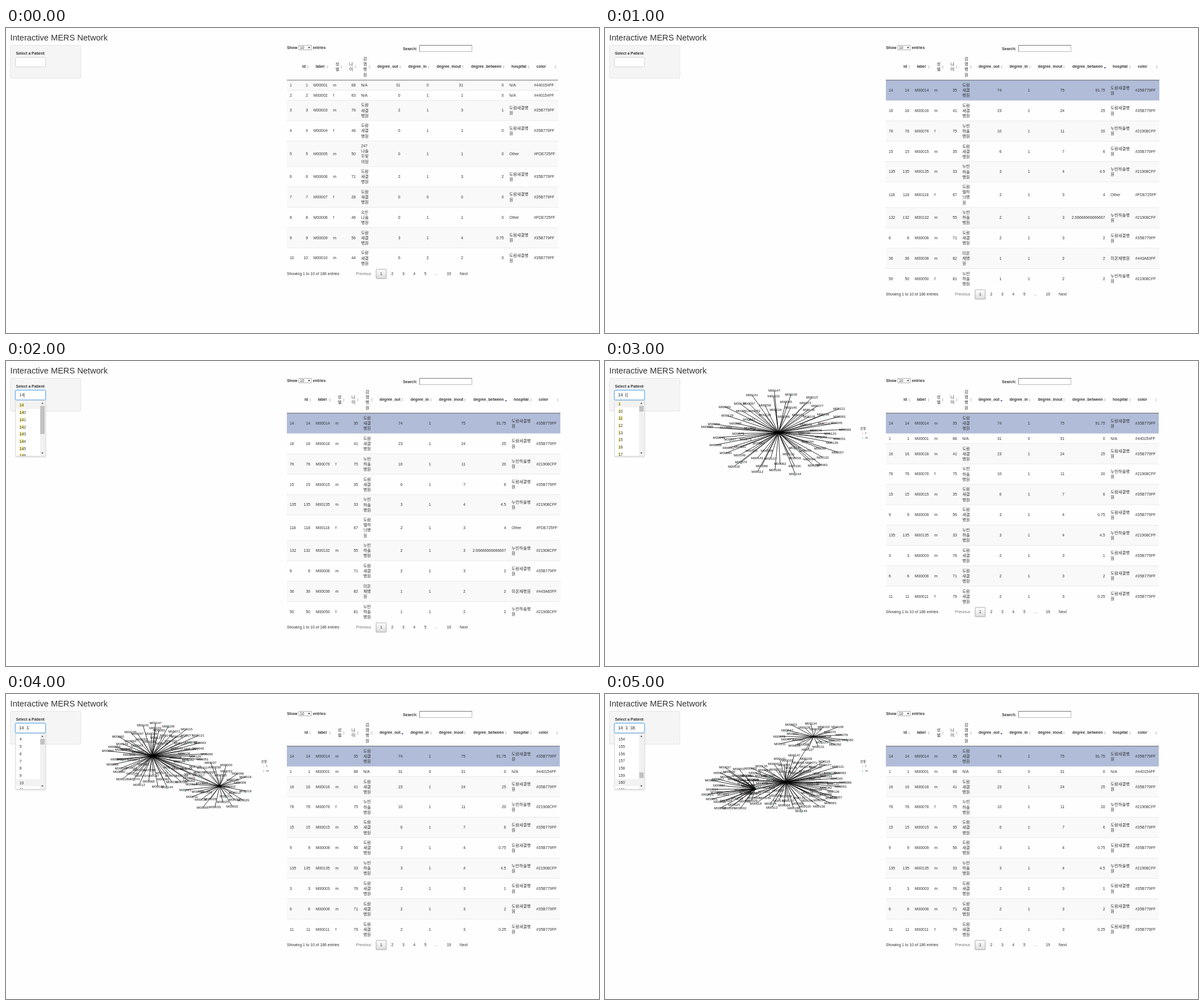
These frames come from a looping animation (1043 px wide and 537 px high, 6000 ms). An HTML page:

```html
<!DOCTYPE html>
<html lang="ko">
<head>
<meta charset="utf-8">
<title>Interactive MERS Network</title>
<style>
html, body { margin: 0; width: 100%; height: 100%; overflow: hidden; background: #fefefe; }
svg { display: block; width: 1043px; height: 537px; }
text { font: 6.84px "Liberation Sans", Arial, "Noto Sans CJK KR", "Noto Sans CJK", sans-serif; fill: #333; white-space: pre; }
.b { font-weight: bold; }
.k { font: 7.3px "Noto Sans CJK KR", "Noto Sans CJK", sans-serif; }
.k.b { font-weight: 500; }
.title { font-size: 14.6px; }
.dim { fill: #777; }
.node { font-size: 5.86px; fill: #111; text-anchor: middle; }
.edge { stroke: #000; stroke-width: .8; }
.slot { visibility: hidden; animation: 6s step-end infinite; }
.for1 { animation-name: one; }
.for2 { animation-name: two; }
.for3 { animation-name: three; }
@keyframes one { 0% { visibility: visible } 16.666%, 100% { visibility: hidden } }
@keyframes two { 0% { visibility: visible } 33.333%, 100% { visibility: hidden } }
@keyframes three { 0% { visibility: visible } 50%, 100% { visibility: hidden } }
</style>
</head>
<body>
<svg id="stage" viewBox="0 0 1043 537"></svg>
<script>
const rect = (x, y, w, h, fill, more = '') =>
  `<rect x="${x}" y="${y}" width="${w}" height="${h}" fill="${fill}" ${more}/>`;
const path = (d, fill) => `<path d="${d}" fill="${fill}"/>`;
const line = (x1, y1, x2, y2, more) => `<line x1="${x1}" y1="${y1}" x2="${x2}" y2="${y2}" ${more}/>`;
// y is the vertical middle of the glyphs
const text = (s, x, y, cls = '', anchor = 'start', size = 6.84) =>
  `<text x="${x}" y="${(y + size * .36).toFixed(2)}" class="${cls}" text-anchor="${anchor}">${s}</text>`;
const right = (s, x, y) => text(s, x, y, '', 'end');
const korean = (lines, x, y, cls = '') => lines.map((s, i) =>
  text(s, x, y + (i - (lines.length - 1) / 2) * 9.15, /[가-힣]/.test(s) ? 'k ' + cls : cls, 'start', 7.2)).join('');
const label = id => 'M' + String(id).padStart(5, 0);
const slot = (start, secs, body) =>
  `<g class="slot for${secs}" style="animation-delay:${start - 6}s">${body}</g>`;

// table
const places = {
  N: ['N/A', 'N/A', '#440154FF'],
  P: ['도람 새결 병원', '도람새결병 원', '#35B779FF'],
  S: ['누빈 하솔 병원', '누빈하솔병 원', '#21908CFF'],
  C: ['247 나솔 두빛 의원', 'Other', '#FDE725FF'],
  A: ['오든 나솔 병원', 'Other', '#FDE725FF'],
  G: ['도람 별하 늬병 원', 'Other', '#FDE725FF'],
  K: ['미온 재병 원', '미온재병원', '#443A83FF']
};

// id sex age place out in between
const patients = {};
`1 m 68 N 31 0 0
2 f 63 N 0 1 0
3 m 76 P 2 1 1
4 f 46 P 0 1 0
5 m 50 C 0 1 0
6 m 71 P 2 1 2
7 f 28 P 0 0 0
8 f 46 A 0 1 0
9 m 56 P 3 1 0.75
10 m 44 P 0 2 0
11 f 79 P 2 1 0.25
14 m 35 P 74 1 91.75
15 m 35 P 6 1 6
16 m 41 P 23 1 25
36 m 82 K 1 1 2
50 f 81 S 1 1 2
76 f 75 S 10 1 20
118 f 67 G 2 1 4
132 m 55 S 2 1 2.66666666666667
135 m 33 S 3 1 4.5`.split('\n').forEach(row => patients[row.split(' ')[0]] = row.split(' '));

const heads = [['id', 521], ['label', 544.5], ['degree_out', 653], ['degree_in', 707.5],
  ['degree_inout', 757.5], ['degree_between', 818], ['hospital', 889], ['color', 933]];
const icons = [531, 565.5, 590, 614.7, 639.5, 693.3, 743.3, 803.3, 875.3, 919.3];

function sortIcon(x, sorted) {
  return sorted ? path(`M${x - 2} 69h4l-2 2.8z`, '#5a62a8')
    : path(`M${x - 1.8} 68h3.6l-1.8 -2.5z M${x - 1.8} 69.2h3.6l-1.8 2.5z`, '#ccc');
}

function pager(y) {
  let s = text('Showing 1 to 10 of 186 entries', 494, y + 9.2) +
    text('Previous', 615.7, y + 9.6, 'dim') +
    rect(651, y + 1.8, 17.8, 16.4, 'url(#btn)', 'stroke="#999" stroke-width=".8" rx="1"');
  ['1', '2', '3', '4', '5', '…'].forEach((t, i) =>
    s += text(t, 660 + i * 19.4, y + 9.6, t === '…' ? 'dim' : '', 'middle'));
  return s + text('19', 779, y + 9.6, '', 'middle') + text('Next', 798, y + 9.6);
}

function table(ids, dx, end, sorted, selected) {
  let s = '', y = 91.8;
  heads.forEach(([t, x]) => s += text(t, x + dx, 68, 'b'));
  s += korean(['성', '별'], 579.5 + dx, 67.8, 'b') + korean(['나', '이'], 603.7 + dx, 67.8, 'b') +
    korean([...'감염병원'], 628.3 + dx, 68.2, 'b');
  icons.forEach((x, i) => s += sortIcon(x + dx, i === sorted));
  s += sortIcon(end - 4.5);
  ids.forEach((key, i) => {
    const [id, sex, age, place, out, inn, between] = patients[key];
    const [ward, hospital, color] = places[place];
    const lines = ward.split(' ');
    const h = lines.length > 1 ? 8.7 + lines.length * 9.05 : 17.75;
    const c = y + h / 2 - .2;
    if (i % 2 === 0) s += rect(494, y, end - 494, h, i || !selected ? '#f9f9f9' : '#b0bcd8');
    if (i) s += line(494, y, end, y, 'stroke="#ddd" stroke-width=".6"');
    s += text(id, 499, c) + right(id, 531 + dx, c) + text(label(id), 540.8 + dx, c) +
      text(sex, 575.3 + dx, c) + right(age, 615 + dx, c) + korean(lines, 624.4 + dx, c) +
      right(out, 693.5 + dx, c) + right(inn, 743.5 + dx, c) + right(+out + +inn, 804 + dx, c) +
      right(between, 875.5 + dx, c) + korean(hospital.split(' '), 885.3 + dx, c) + text(color, 928.8 + dx, c);
    y += h;
  });
  return s + line(494, 91.8, end, 91.8, 'stroke="#555" stroke-width=".9"') + pager(y - .2);
}

// patient picker
function picker(items, typed, options, y0, active, mark, thumb, size) {
  let x = 22, s = rect(16, 51, 54, 18, 'none', 'stroke="#66afe9" stroke-opacity=".3" stroke-width="2" rx="2.5"') +
    rect(16.5, 51.5, 53, 17, '#fff', 'stroke="#66afe9" rx="2"');
  for (const t of items) {
    const w = t.length * 3.8 + 3;
    s += rect(x, 55.2, w, 9.6, '#efefef', 'rx="1"') + text(t, x + 1.6, 60);
    x += w + 2;
  }
  if (typed) {
    if (!items.length) x = 23.6;
    const cx = x + typed.length * 3.8 + .8;
    s += text(typed, x, 60) + line(cx, 56, cx, 64, 'stroke="#333" stroke-width=".7"');
  }
  s += rect(17, 70, 53, 99.5, '#000', 'opacity=".13" filter="url(#soft)"') +
    rect(17, 69.6, 52.6, 98, '#fff', 'stroke="#d0d0d0" stroke-width=".7"');
  let list = '';
  options.forEach((t, i) => {
    const y = y0 + i * 12.68;
    if (i === active) list += rect(17, y - 6.3, 43, 12.6, '#f2f2f2');
    // every typed digit run is marked, so "1" lights both digits of 11
    const hits = mark ? t.split(mark).length - 1 : 0;
    if (hits) list += rect(23.7, y - 3.9, hits * mark.length * 3.8, 7.6, '#faf2a4');
    list += text(t, 23.7, y);
  });
  return s + `<g clip-path="url(#list)">${list}</g>` +
    rect(59.8, 70, 9.4, 97.2, '#f1f1f1') + rect(60.2, thumb, 7.8, size, '#c1c1c1') +
    path('M62 75.5h4l-2 -2.5z M62 161h4l-2 2.5z', '#505050');
}

// networks
let seed = 7;
const rand = () => (seed = seed * 16807 % 2147483647) / 2147483647;
const link = (a, b) => line(a.x, a.y, b.x, b.y, 'class="edge"');

// spokes run from (x, y) to labels spread like sunflower seeds over an ellipse at (cx, cy)
function hub({ x, y, cx, cy, rx, ry, n, first = 38 }) {
  let edges = '', labels = '';
  const span = first < 38 ? 37 : 113;
  for (let i = 0; i < n; i++) {
    const a = i * 2.39996 + rand() * .15;
    const r = Math.sqrt(.12 + .88 * (i + .5) / n) * (.97 + rand() * .06);
    const nx = (cx + rx * r * Math.cos(a)).toFixed(1), ny = +(cy + ry * r * Math.sin(a)).toFixed(1);
    edges += line(x, y, nx, ny, 'class="edge"');
    if (i % 9 === 3) labels += `<circle cx="${nx}" cy="${ny + 2.5}" r=".9" fill="#2aa198"/>`;
    labels += text(label(first + i * 29 % span), nx, ny, 'node', 'middle', 5.86);
  }
  return edges + `<circle cx="${x}" cy="${y}" r="1.8"/>` + labels;
}

const single = hub({ x: 305, y: 126, cx: 305, cy: 127, rx: 125, ry: 76, n: 74 });

const big = { x: 257, y: 109, cx: 267, cy: 109, rx: 88, ry: 60, n: 74 };
const small = { x: 376, y: 162, cx: 372, cy: 162, rx: 58, ry: 45, n: 31, first: 2 };
const pair = link(big, small) + hub(big) + hub(small);

const top3 = { x: 367, y: 75, cx: 364, cy: 74, rx: 65, ry: 26, n: 23 };
const left3 = { x: 264, y: 167, cx: 222, cy: 167, rx: 44, ry: 41, n: 31, first: 2 };
const main3 = { x: 318, y: 155, cx: 332, cy: 158, rx: 96, ry: 50, n: 74 };
const triple = link(main3, top3) + link(main3, left3) + hub(left3) + hub(main3) + hub(top3);

const legend = '<g transform="translate(448.8 119) scale(.72)">' + korean(['성별'], 0, 0, 'b') + '</g>' +
  rect(452.3, 126.8, 1.5, 1.5, '#e0aa98') + rect(452.3, 134.8, 1.5, 1.5, '#4db6ac') +
  '<g transform="translate(458 0) scale(.72)">' + text('f', 0, 177) + text('m', 0, 188) + '</g>';

const count = (from, n = 8) => Array.from({ length: n }, (_, i) => String(from + i));

document.getElementById('stage').innerHTML = `<defs>
  <linearGradient id="btn" x2="0" y2="1"><stop stop-color="#fff"/><stop offset="1" stop-color="#dcdcdc"/></linearGradient>
  <filter id="soft" x="-20%" y="-20%" width="140%" height="140%"><feGaussianBlur stdDeviation="1.6"/></filter>
  <clipPath id="list"><rect x="17" y="70" width="43" height="97.3"/></clipPath></defs>` +
  text('Interactive MERS Network', 7.6, 17, 'title', 'start', 14.6) +
  rect(7.9, 30.5, 123.8, 57.8, '#f5f5f5', 'stroke="#e0e0e0" stroke-width=".8" rx="2"') +
  text('Select a Patient', 17.4, 44.2, 'b') +
  rect(16.5, 51.5, 53, 17, '#fff', 'stroke="#ccc" stroke-width=".8" rx="2"') +
  text('Show', 494.3, 34.6, 'b') + rect(515, 30.5, 22, 8, '#fff', 'stroke="#999" stroke-width=".8"') +
  text('10', 517, 34.6) + path('M531.2 33.6h3.6l-1.8 2.6z', '#222') + text('entries', 539.8, 34.6, 'b') +
  text('Search:', 698.3, 36.1, 'b') +
  rect(727.5, 30.5, 92, 11, '#fff', 'stroke="#bbb"') +
  line(727, 30.5, 820, 30.5, 'stroke="#777"') + line(727.5, 30, 727.5, 42, 'stroke="#888"') +
  slot(0, 1, table(count(1, 10), 0, 971, -1, false)) +
  slot(1, 2, table([14, 16, 76, 15, 135, 118, 132, 6, 36, 50], 4, 975, 8, true)) +
  slot(3, 3, table([14, 1, 16, 76, 15, 9, 135, 3, 6, 11], 4, 974, 5, true) + legend) +
  slot(3, 1, single) + slot(4, 1, pair) + slot(5, 1, triple) +
  slot(2, 1, picker([], '14', ['14', ...count(140, 7)], 78, 0, '14', 79, 49.5)) +
  slot(3, 1, picker(['14'], '1', ['1', ...count(10, 4), ...count(15, 3)], 75.6, 0, '1', 79, 10)) +
  slot(4, 1, picker(['14', '1'], '', count(4), 80, 6, '', 79, 10)) +
  slot(5, 1, picker(['14', '1', '16'], '', count(154), 79.7, 6, '', 138, 10));
</script>
</body>
</html>
```
